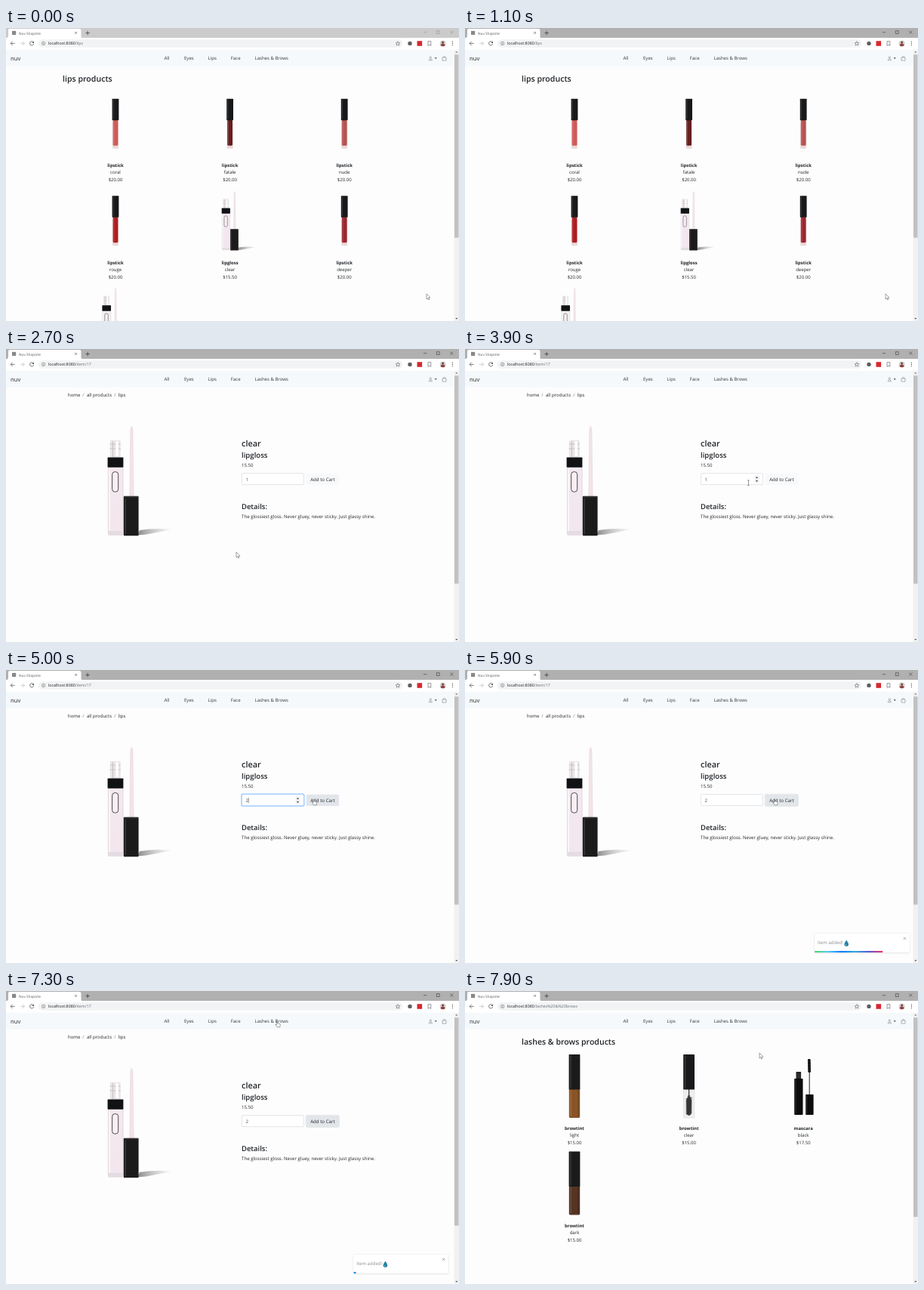
Animation, 600 px wide and 388 px high, one loop 8 s. Source, as an HTML page:

```html
<!DOCTYPE html>
<html lang="en">
<head>
<meta charset="utf-8">
<title>Nuv Shopsite</title>
<style>
html, body { margin: 0; width: 100%; height: 100%; overflow: hidden; background: #fdfdfd; }
svg { display: block; width: 100%; height: 100%; }
text { font-family: "Open Sans", "Noto Sans", sans-serif; text-rendering: geometricPrecision; white-space: pre; }
</style>
</head>
<body>
<svg id="stage" viewBox="0 0 600 388" xmlns="http://www.w3.org/2000/svg"></svg>
<script>
const LOOP = 8000;
const INK = '#212529';

// Markup helpers
const rect = (x, y, w, h, fill, extra = '') =>
  `<rect x="${x}" y="${y}" width="${w}" height="${h}" fill="${fill}" ${extra}/>`;
const path = (d, stroke, width = 0.7, extra = '') =>
  `<path d="${d}" fill="none" stroke="${stroke}" stroke-width="${width}" ${extra}/>`;
const shape = (d, fill, extra = '') => `<path d="${d}" fill="${fill}" ${extra}/>`;
const circle = (x, y, r, fill, extra = '') =>
  `<circle cx="${x}" cy="${y}" r="${r}" fill="${fill}" ${extra}/>`;
const text = (x, y, s, size = 6.05, extra = '', fill = INK) =>
  `<text x="${x}" y="${y}" font-size="${size}" fill="${fill}" ${extra}>${s.replace(/&/g, '&amp;')}</text>`;
const group = (id, body, extra = '') => `<g id="${id}" ${extra}>${body}</g>`;
const MID = 'text-anchor="middle"';
const SEMI = 'font-weight="600"';

// Products
function lipstick(color) {
  return rect(-4, 31, 8, 35, '#ead9d8', 'rx="1"') +
    rect(-3.4, 28, 6.8, 34, color, 'rx="1.4"') +
    rect(-2.6, 30, 1, 31, '#fff', 'opacity=".18"') +
    rect(-4.4, 0, 8.8, 28.5, '#17181a', 'rx=".6"') +
    rect(-3.2, 1, 0.8, 26, '#45474b');
}

function gloss(fluid = 'url(#fluid)') {
  return shape('M174 246.5L177 240Q198 236.5 219 239Q203 242.5 186 245.5Z', 'url(#shade)') +
    shape('M163.8 195L164.9 106Q166.4 99 167.9 106L169 195Z', '#f3e4e8', 'stroke="#dccfd6" stroke-width=".5"') +
    rect(137.8, 120.8, 14, 23, '#e9e5e8', 'rx="2"') +
    path('M138 126H151.6M137.6 132H152M141.5 122V143', '#c4bdc2', 0.9) +
    rect(145.5, 122, 3.4, 20, '#fff') +
    rect(135.4, 155, 19.7, 91.3, fluid, 'rx="1.5" stroke="#d2c4cc" stroke-width=".6"') +
    path('M137 159V243', '#fff', 1.2) +
    rect(135.9, 241, 18.8, 4.8, '#e4dce2') +
    rect(140.7, 162.6, 8, 26.6, '#f7eff4', 'rx="3.6" stroke="#55484f" stroke-width="1"') +
    rect(134.6, 143.4, 20.8, 13.4, '#111214', 'rx=".8"') +
    rect(155.8, 194.8, 19.8, 52.4, '#1c1b1c', 'rx="1"') +
    path('M158.2 198V245', '#3b3a3c', 1.4) +
    path('M156.4 195.8H175', '#4c4b4d', 0.8);
}

const tintCap = rect(-7.4, 0, 14.8, 46.5, '#1a1a1c', 'rx=".7"') +
  rect(-5.6, 1, 1.3, 44, '#3d3d40');

function tint(color) {
  return rect(-7.2, 45, 14.4, 39, color, 'rx="1.4"') +
    rect(-5.5, 47, 1.4, 35, '#fff', 'opacity=".15"') +
    rect(4.4, 47, 1.8, 35, '#000', 'opacity=".15"') + tintCap;
}

function clearTint() {
  let hairs = '';
  for (let y = 58; y < 80; y += 2) hairs += `M-4 ${y + 1}L4 ${y - 1}`;
  return rect(-7.2, 45, 14.4, 39, '#eeeeee', 'rx="1.4" stroke="#cfcfcf" stroke-width=".5"') +
    path('M0 46V80', '#333', 1.2) +
    shape('M-1 54L-3.4 61L-3 79Q0 83 3 79L3.4 61L1 54Z', '#444') +
    path(hairs, '#222', 0.9) + tintCap;
}

function mascara() {
  return rect(-9.7, 23, 6.6, 11, '#232323', 'rx=".5"') +
    path('M-9.5 27H-3.3M-9.5 30H-3.3', '#555', 0.5) +
    rect(-12, 32, 11.3, 48, '#0c0c0d', 'rx=".8"') +
    rect(-10.6, 34, 0.8, 45, '#3a3a3c') +
    path('M8 21V54', '#222', 1) +
    path('M7.6 7L8 23', '#151515', 3.8, 'stroke-dasharray="1.1 .25"') +
    path('M7.6 6L8 24', '#151515', 2.8) +
    rect(3, 53, 10.4, 27, '#0c0c0d', 'rx=".7"') +
    rect(4.2, 54, 0.8, 25, '#3a3a3c');
}

const at = (x, y, body) => `<g transform="translate(${x} ${y})">${body}</g>`;
const label = (col, row, name, kind, price) => {
  const x = 145 + col * 151.6, y = 184 + row * 128.5;
  return text(x, y, name, 5.95, MID + ' font-weight="700"') +
    text(x, y + 9.4, kind, 6.05, MID) + text(x, y + 19, price, 6, MID);
};
const glossAt = (id, x, y, s, fluid) =>
  group(id, gloss(fluid), `transform="translate(${x} ${y}) scale(${s})"`);

const lipsPage = text(75, 71.2, 'lips products', 10.6, SEMI) +
  [['coral', '#cf5a58', 0, 0], ['fatale', '#64201f', 1, 0], ['nude', '#b65350', 2, 0],
   ['rouge', '#ad1d20', 0, 1], ['deeper', '#9c2630', 2, 1]].map(([kind, color, col, row]) =>
    at(145 + col * 151.6, 93.7 + row * 128.5, lipstick(color)) +
    label(col, row, 'lipstick', kind, '$20.00')).join('') +
  glossAt('thumb', 213, 161, 0.54) + label(1, 1, 'lipgloss', 'clear', '$15.50') +
  glossAt('next', 52, 287, 0.56, '#efefef');

const lashPage = text(75, 71.2, 'lashes & brows products', 10.55, SEMI) +
  at(145, 84, tint('#8a5427')) + label(0, 0, 'browtint', 'light', '$15.00') +
  at(296.6, 84, clearTint()) + label(1, 0, 'browtint', 'clear', '$15.00') +
  at(448.2, 84, mascara()) + label(2, 0, 'mascara', 'black', '$17.50') +
  at(145, 212.5, tint('#553424')) + label(0, 1, 'browtint', 'dark', '$15.00');

const itemPage = text(82, 62.7, 'home') + text(101.2, 62.7, '/', 6.05, '', '#6c757d') +
  text(107, 62.7, 'all products') + text(143.2, 62.7, '/', 6.05, '', '#6c757d') + text(148.8, 62.7, 'lips') +
  group('photo', gloss()) +
  text(312, 128.6, 'clear', 10.9, SEMI) + text(312, 143.6, 'lipgloss', 9.6, SEMI) +
  text(312, 156.2, '15.50') +
  rect(311.9, 164.2, 83, 16, 'none', 'id="ring" rx="2" stroke="#80bdff" stroke-opacity=".75" stroke-width="1.3"') +
  rect(312.4, 164.7, 82, 15, '#fff', 'id="field" rx="1.5" stroke-width=".6"') +
  `<text id="qty" x="317.6" y="174.8" font-size="6.05" fill="#495057"></text>` +
  path('M321.2 169V176.2', '#222', 0.5, 'id="caret"') +
  group('spin', rect(383.5, 167.3, 6, 10.2, '#f1f1f1') +
    shape('M385 171L386.5 168.9L388 171ZM385 174L386.5 176.1L388 174Z', '#444')) +
  rect(397.2, 164.2, 44.3, 16.3, 'none', 'id="glow" rx="2" stroke="#d8d9db" stroke-opacity=".6" stroke-width="1"') +
  rect(397.7, 164.7, 43.3, 15.3, '#f8f9fa', 'id="button" rx="1.6"') +
  text(419.4, 174.7, 'Add to Cart', 6.15, MID) +
  text(312, 211.8, 'Details:', 9.45, SEMI) +
  text(312, 224.3, 'The glossiest gloss. Never gluey, never sticky. Just glassy shine.', 6.13);

const toast = rect(0, 0, 125.4, 25.2, '#fff', 'rx=".6" filter="url(#soft)"') +
  text(3.8, 14.4, 'Item added!', 6.05, '', '#8d8d8d') +
  shape('M42 8.9Q39.2 12.8 39.2 14.3A2.8 2.8 0 0 0 44.8 14.3Q44.8 12.8 42 8.9Z', '#2582a6') +
  path('M40.9 14.2Q40.8 15.5 42 15.9', '#b5e0f3', 0.7) +
  path('M117.6 4.9L120.8 8.1M120.8 4.9L117.6 8.1', '#888', 0.7) +
  rect(0, 23.1, 125.4, 2.1, 'url(#rainbow)', 'id="bar"');

const navBar = rect(0, 28.5, 594, 22, '#f6f9fb') +
  text(6, 42.5, 'nuv', 7.7) +
  [['All', 209.5], ['Eyes', 236], ['Lips', 267.6], ['Face', 297.8], ['Lashes & Brows', 329.5]]
    .map(([s, x]) => text(x, 42.2, s, 6.05, '', '#333')).join('') +
  circle(562.3, 39, 1.2, 'none', 'stroke="#777" stroke-width=".5"') +
  path('M560.1 42.8Q560.1 40.9 562.3 40.9Q564.5 40.9 564.5 42.8Z', '#777', 0.5) +
  shape('M567.5 39.2H570.9L569.2 41Z', '#444') +
  path('M578 39.1H583V43.1H578ZM579.1 39Q579.1 37.4 580.5 37.4Q581.9 37.4 581.9 39', '#777', 0.55);

const browser = rect(0, 0, 600, 14, '#b0b0b0', 'id="strip"') +
  shape('M0 13.5Q3 13 3 10V3Q3 1 5 1H97Q99.5 1 99.5 3V11Q99.5 13.5 102 13.5Z', '#fff') +
  rect(0, 13, 600, 15.5, '#fff') +
  rect(8, 3.9, 5.2, 5.2, '#888') +
  text(17, 8.6, 'Nuv Shopsite', 4.7, '', '#555') +
  path('M91.2 5L94 7.8M94 5L91.2 7.8', '#444', 0.6) +
  path('M105.4 6.6H110.8M108.1 3.9V9.3', '#333', 0.7) +
  group('controls', path('M553 5.7H557.3M570.4 3.7H574.2V7.5H570.4ZM588.3 3.6L592.3 7.6M592.3 3.6L588.3 7.6', '#222', 0.5)) +
  path('M11.6 20.4H6.2M8.7 17.8L6.1 20.4L8.7 23', '#444', 0.7) +
  path('M19 20.4H24.4M21.9 17.8L24.5 20.4L21.9 23', '#bbb', 0.7) +
  path('M36.2 18.7A2.6 2.6 0 1 0 36.7 21', '#444', 0.7) + shape('M36.9 17.4V19.9H34.4Z', '#444') +
  rect(42.8, 15.2, 482.5, 10.6, '#f1f3f4', 'rx="5.3"') +
  circle(49.6, 20.4, 2.2, 'none', 'stroke="#555" stroke-width=".5"') +
  path('M49.6 20V21.7M49.6 18.9V19.4', '#555', 0.6) +
  text(56, 22.4, 'localhost:8080', 5.3, '', '#222').replace('</text>',
    '<tspan id="url" fill="#6a6e72"></tspan></text>') +
  shape('M519 17.6L519.8 19.6L521.9 19.7L520.3 21L520.8 23.1L519 21.9L517.2 23.1L517.7 21L516.1 19.7L518.2 19.6Z',
    'none', 'stroke="#555" stroke-width=".55"') +
  circle(535, 20.4, 2.7, '#5c5f63') +
  rect(544.5, 17.2, 6.6, 6.6, '#d7282f') +
  path('M559 17.6H562.8V23.4L560.9 22L559 23.4Z', '#555', 0.6) +
  circle(578.6, 20.4, 4, '#d5d0ce') + circle(578.6, 18.9, 1.5, '#6b4640') +
  shape('M575.5 22.9Q576 20.4 578.6 20.4Q581.2 20.4 581.7 22.9Q578.6 25.6 575.5 22.9Z', '#8d3f3c') +
  [18.2, 20.4, 22.6].map(y => circle(591.4, y, 0.6, '#444')).join('');

const scrollbar = rect(593.5, 28.5, 6.5, 359.5, '#f1f1f1') +
  shape('M595.2 32.6L596.8 30.8L598.4 32.6Z', '#777') + shape('M595.2 384L596.8 385.8L598.4 384Z', '#555') +
  rect(594, 35.2, 5.5, 240, '#c1c1c1', 'id="thumbBar"');

const OUTLINE = 'stroke="#444" stroke-width=".5" stroke-linejoin="round"';
const pointers = {
  arrow: shape('M0 0V7L1.6 5.6L2.7 8L3.8 7.5L2.7 5.2H4.9Z', '#fff', OUTLINE),
  hand: shape('M0 .2Q.8 -.3 1.1 .5V3L4 3.5Q4.9 3.7 4.8 4.6L4.2 7.8H.6L-1.6 4.8Q-1.5 3.9 -.6 4.5L-.1 5Z', '#fff', OUTLINE),
  beam: path('M-1.3 -3.3H1.3M0 -3.3V3.3M-1.3 3.3H1.3', '#333', 0.5)
};

const rainbow = ['#4cd964', '#5ac8fa', '#007aff', '#34aadc', '#5856d6', '#ff2d55'];
document.getElementById('stage').innerHTML = `<defs>
  <linearGradient id="rainbow">${rainbow.map((c, i) => `<stop offset="${i / 5}" stop-color="${c}"/>`).join('')}</linearGradient>
  <linearGradient id="fluid" x2="0" y2="1"><stop stop-color="#f3e9ef"/><stop offset="1" stop-color="#f3e6ee"/></linearGradient>
  <linearGradient id="shade"><stop stop-color="#888"/><stop offset="1" stop-color="#ddd" stop-opacity=".3"/></linearGradient>
  <filter id="soft" x="-10%" y="-30%" width="120%" height="160%"><feDropShadow dx="0" dy=".4" stdDeviation="1.3" flood-opacity=".16"/></filter>
  <clipPath id="view"><rect y="28" width="593.5" height="360"/></clipPath></defs>` +
  rect(0, 0, 600, 388, '#fdfdfd') +
  group('lips', lipsPage) + group('item', itemPage) + group('lash', lashPage) +
  navBar + `<g clip-path="url(#view)">${group('toast', toast)}</g>` + scrollbar + browser +
  group('pointer', Object.keys(pointers).map(k => group(k, pointers[k])).join(''));

const el = {};
document.querySelectorAll('#stage [id]').forEach(n => { el[n.id] = n; });
const set = (id, name, value) => el[id].setAttribute(name, value);
const show = (id, on) => set(id, 'display', on ? 'inline' : 'none');

// Motion
const clamp = v => Math.max(0, Math.min(1, v));
const smooth = u => u * u * (3 - 2 * u);
const easeOut = u => 1 - (1 - u) ** 3;

function track(keys, t, ease) {
  let i = 0;
  while (i < keys.length - 1 && t >= keys[i + 1][0]) i++;
  const a = keys[i], b = keys[i + 1] || a;
  const u = ease(a === b ? 0 : clamp((t - a[0]) / (b[0] - a[0])));
  return a.slice(1).map((v, k) => v + (b[k + 1] - v) * u);
}

const MOVES = [
  [0, 557, 352], [1300, 557, 352], [1400, 547, 331], [1500, 547, 331], [1600, 345, 273],
  [1700, 345, 273], [1900, 305, 269], [2700, 305, 269], [3500, 392, 184], [3700, 392, 180],
  [4200, 345, 172], [4600, 345, 172], [5000, 407, 171], [5400, 409.5, 171], [6300, 409.5, 171],
  [7000, 358.5, 40], [7400, 358.5, 40], [7800, 390, 82]
];
const TOAST_IN = 5330, TOAST_OUT = 7350;
const ENTER = [[0, 1170], [0.6, -9.8], [0.75, 3.9], [0.9, -2], [1, 0]];

function drawToast(t) {
  const on = t >= TOAST_IN && t < TOAST_OUT + 700;
  show('toast', on);
  if (!on) return;
  let dx = track(ENTER, clamp((t - TOAST_IN) / 750), easeOut)[0];
  if (t > TOAST_OUT) {
    dx = track([[0, 0], [0.2, -7.8], [1, 780]], (t - TOAST_OUT) / 700, u => u)[0];
  }
  set('toast', 'transform', `translate(${460.4 + dx} 348.9)`);
  set('bar', 'transform', `scale(${clamp(1 - (t - TOAST_IN) / 2020)} 1)`);
}

function draw(ms) {
  const t = Math.floor(ms / 100) * 100;
  const page = t < 2300 ? 'lips' : t < 7400 ? 'item' : 'lash';
  for (const p of ['lips', 'item', 'lash']) show(p, p === page);
  el.url.textContent = { lips: '/lips', item: '/item/17', lash: '/lashes%20&%20brows' }[page];
  set('thumbBar', 'height', { lips: 242.5, item: 275.5, lash: 264 }[page]);

  const active = t >= 1100;
  set('strip', 'fill', active ? '#b0b0b0' : '#cbcbcb');
  set('controls', 'opacity', active ? 1 : 0.4);

  set('thumb', 'opacity', 1 - 0.2 * clamp((t - 1700) / 400));
  show('photo', t >= 2400);

  const [x, y] = track(MOVES, t, smooth);
  const overField = page === 'item' && x > 312 && x < 395 && y > 164 && y < 181;
  const overButton = page === 'item' && x > 397 && x < 442 && y > 164 && y < 181;
  const overLink = (page === 'lips' && x < 333) || (page === 'item' && t >= 6900 && y < 46);
  const focus = t >= 4300 && t < 5300;
  const pressed = t >= 5300;

  show('ring', focus);
  set('field', 'stroke', focus ? '#80bdff' : '#ced4da');
  show('spin', focus || overField);
  show('caret', focus && (t - 4300) % 1000 < 900);
  el.qty.textContent = t < 4700 ? '1' : '2';
  set('button', 'fill', overButton || pressed ? '#e2e6ea' : '#f8f9fa');
  show('glow', pressed);

  const kind = overButton || overLink ? 'hand' : overField && x < 383 ? 'beam' : 'arrow';
  for (const k in pointers) show(k, k === kind);
  set('pointer', 'transform', `translate(${x} ${y})`);
  drawToast(t);
}

const start = performance.now();
function tick() {
  draw((performance.now() - start) % LOOP);
  requestAnimationFrame(tick);
}
tick();
</script>
</body>
</html>
```
